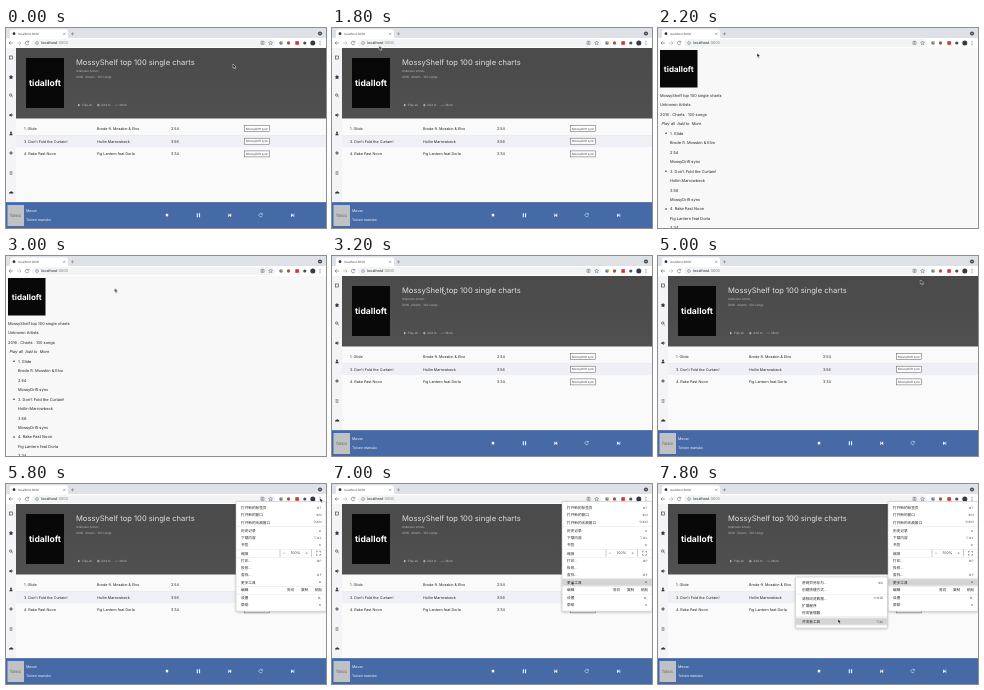
Animation of 320 by 200 pixels, one loop 8 s. Source, as an HTML page:

```html
<!DOCTYPE html>
<html lang="en">
<head>
<meta charset="utf-8">
<title>Music page</title>
<style>
  html, body { margin: 0; width: 100%; height: 100%; overflow: hidden; background: #fff; }
  svg { display: block; width: 100vw; height: 100vh; }
  text { font-family: Inter, "Noto Sans CJK SC", "Noto Sans CJK", "DejaVu Sans", sans-serif; white-space: pre; text-rendering: geometricPrecision; }
  .styled, .plain, .menu, .submenu, .hover, .subhover { animation: 8s step-end infinite; }
  .styled { animation-name: styled; }
  .plain { animation-name: plain; }
  .menu { animation-name: menu; }
  .submenu { animation-name: submenu; }
  .hover { animation-name: hover; }
  .subhover { animation-name: subhover; }
  .cursor { animation: cursor 8s linear infinite; }
  @keyframes styled { 0% { opacity: 1 } 27.5% { opacity: 0 } 40%, 100% { opacity: 1 } }
  @keyframes plain { 0% { opacity: 0 } 27.5% { opacity: 1 } 40%, 100% { opacity: 0 } }
  @keyframes menu { 0% { opacity: 0 } 72.5%, 100% { opacity: 1 } }
  @keyframes submenu { 0% { opacity: 0 } 92.5%, 100% { opacity: 1 } }
  @keyframes hover {
    0% { opacity: 0; transform: translateY(24px) }
    80% { opacity: 1; transform: translateY(31px) }
    82.5% { opacity: 1; transform: translateY(54px) }
    85% { opacity: 1; transform: translateY(77px) }
    87.5%, 100% { opacity: 1; transform: translateY(98.2px) }
  }
  @keyframes subhover {
    0% { opacity: 0; transform: translateY(121.4px) }
    95% { opacity: 1; transform: translateY(121.4px) }
    97.5%, 100% { opacity: 1; transform: translateY(137.4px) }
  }
  @keyframes cursor {
    0%, 2.5% { transform: translate(227px, 36px) }
    15%, 20% { transform: translate(21px, 14px) }
    27.5% { transform: translate(99px, 25px) }
    40%, 47.5% { transform: translate(111px, 34px) }
    60%, 62.5% { transform: translate(262.5px, 24px) }
    70%, 77.5% { transform: translate(314px, 14px) }
    87.5%, 90% { transform: translate(239.5px, 97px) }
    92.5% { transform: translate(225px, 98px) }
    97.5%, 100% { transform: translate(180px, 135px) }
  }
</style>
</head>
<body>
<svg id="stage" viewBox="0 0 320 200" preserveAspectRatio="none"></svg>
<script>
const rect = (x, y, w, h, fill, more = '') =>
  `<rect x="${x}" y="${y}" width="${w}" height="${h}" fill="${fill}" ${more}/>`;
const dot = (x, y, r, fill, more = '') => `<circle cx="${x}" cy="${y}" r="${r}" fill="${fill}" ${more}/>`;
const line = (d, color, width = 0.6) =>
  `<path d="${d}" fill="none" stroke="${color}" stroke-width="${width}"/>`;
const shape = (d, fill) => `<path d="${d}" fill="${fill}"/>`;
// y is the vertical middle of the line
const text = (x, y, s, size = 3.7, fill = '#222', more = '') =>
  `<text x="${x}" y="${y + size * 0.36}" font-size="${size}" fill="${fill}" ${more}>${s.replace(/&/g, '&amp;')}</text>`;
const group = (name, ...parts) => `<g class="${name}">${parts.join('')}</g>`;
const END = 'text-anchor="end"';
const MIDDLE = 'text-anchor="middle"';

const album = 'MossyShelf top 100 single charts';
const sync = 'MossyDrift sync';
const songs = [
  ['1. Glide', 'Brode ft. Mosskin & Elvo', '2:54'],
  ["3. Don't Fold the Curtain!", 'Hollin Marrowbeck', '3:56'],
  ['4. Rake Past Noon', 'Fig Lantern feat Dorla', '3:34'],
];

function cover(x, y, w, h, size) {
  return rect(x, y, w, h, '#080808') +
    text(x + w / 2, y + h / 2, 'tidalloft', size, '#fff', `font-weight="700" ${MIDDLE}`);
}

function browser() {
  const grey = '#5f6368';
  return [
    rect(0, 0, 320, 20, '#dee1e6'),
    shape('M2 10.5 Q4 10.5 4 8 V3.5 Q4 1.5 6 1.5 H60 Q62 1.5 62 3.5 V8 Q62 10.5 64 10.5Z', '#fff'),
    rect(0, 10, 320, 10, '#fff'),
    dot(8, 5.7, 1.4, '#333'),
    text(12, 5.8, 'localhost:3000', 3, '#444'),
    line('M57.2 4.8l2 2m0-2l-2 2M65 5.8h3m-1.5-1.5v3', grey, 0.45),
    dot(314, 5.5, 2.1, '#494c50'),
    line('M313 5l1 1l1-1', '#fff', 0.4),
    line('M7 15h-4m1.7-1.7l-1.7 1.7l1.7 1.7', grey),
    line('M11 15h4m-1.7-1.7l1.7 1.7l-1.7 1.7', '#aaa'),
    line('M22.5 13.9a1.8 1.8 0 1 0 .3 1.7M22.8 12.8v1.4h-1.4', grey),
    rect(26, 11.3, 243, 7.6, '#f1f3f4', 'rx="3.8"'),
    dot(31, 15, 1.4, 'none', `stroke="${grey}" stroke-width=".5"`),
    text(35, 15, 'localhost', 3.8, '#222'),
    text(51.4, 15, ':3000', 3.8, '#777'),
    line('M255 13.3h3v3h-3zM256.5 13.3v3M264.6 13l.6 1.2 1.4.2-1 1 .2 1.3-1.2-.6-1.2.6.2-1.3-1-1 1.4-.2z', grey, 0.5),
    dot(275, 15, 1.8, '#5b7fb0'),
    dot(276, 14, 1.1, '#edc24d'),
    dot(282.5, 15, 1.7, '#a4544e'),
    rect(289.3, 13.2, 3.6, 3.6, '#d6362f'),
    dot(298.8, 15, 1.6, '#4a4d52'),
    dot(306.8, 15, 2.5, '#333b4a'),
    [13.2, 15, 16.8].map(y => dot(314, y, 0.5, grey)).join(''),
  ].join('');
}

function sidebar() {
  const ink = '#303238';
  return [
    rect(0, 20, 10, 154, '#f4f4f6'),
    rect(3.5, 28, 3, 3, 'none', `stroke="${ink}" stroke-width=".6"`),
    shape('M5 46.8l.8 1.5 1.5.2-1.1 1.1.3 1.6-1.5-.8-1.5.8.3-1.6-1.1-1.1 1.5-.2z', ink),
    dot(4.7, 67, 1.2, 'none', `stroke="${ink}" stroke-width=".6"`),
    line('M5.6 68l1.2 1.2', ink),
    shape('M3.4 86.2h1.1l1.2-1v3.8l-1.2-1H3.4z', ink),
    line('M6.4 86q.8 1.1 0 2.2', ink, 0.4),
    dot(5, 104.4, 0.9, ink),
    shape('M3.4 107.3q0-2 1.6-2t1.6 2z', ink),
    dot(5, 125, 1.1, 'none', `stroke="${ink}" stroke-width=".9"`),
    line('M3.6 143.7h2.8m-2.8 1.3h2.8m-2.8 1.3h2.8', ink, 0.5),
    shape('M3 165.4q-.3-1.5 1.1-1.5 1.2-1.6 2.4.2 1.2.2.8 1.3z', ink),
  ].join('');
}

function player() {
  const white = '#f4f7fc';
  return [
    rect(0, 174, 320, 26, '#466aa6'),
    rect(0, 174, 320, 0.6, '#6e8cbb'),
    rect(1.5, 177, 16.5, 21, '#bfc1c3'),
    text(9.7, 187.5, 'folsic', 4.3, '#62656a', MIDDLE),
    text(20, 182.5, 'Meow', 3.7, white),
    text(20, 191.5, 'Tolven marisko', 3.5, white),
    rect(159.8, 185.8, 2.4, 2.6, white),
    shape('M190.8 185.2h1.1v4h-1.1zM193 185.2h1.1v4H193z', white),
    shape('M222 185.4h.6v3.6h-.6zM222.6 187.2l2.6-1.8v3.6z', white),
    line('M256 186a1.7 1.7 0 1 0 .3 1.6M256.5 185v1.3h-1.3', white, 0.5),
    shape('M285 185.4l2.6 1.8-2.6 1.8zM287.6 185.4h.6v3.6h-.6z', white),
  ].join('');
}

function styledPage() {
  const pale = '#bdbdbd';
  const rows = songs.map(([title, artist, time], i) => {
    const y = 100.5 + i * 12.7;
    return (i === 1 ? rect(10, 107.3, 310, 11.7, '#eff0f5') + rect(10, 107, 310, 0.5, '#f1dede') : '') +
      text(18, y, title) + text(91, y, artist) + text(165, y, time) +
      rect(238.7, y - 3, 25, 6, '#fff', 'stroke="#555" stroke-width=".5"') +
      text(251.2, y, sync, 2.9, '#333', MIDDLE);
  });
  return group('styled',
    rect(10, 20, 310, 154, '#fafafa'),
    rect(10, 20, 310, 70.5, 'url(#head)'),
    cover(20, 30, 38, 50, 8.6),
    text(70, 34.3, album, 7.6, '#dedede'),
    text(70, 43.3, 'Unknown Artists', 2.9, pale),
    text(70, 49, '2016 . Charts . 100 songs', 3, pale),
    shape('M72 75.8l2.2 1.3-2.2 1.3z', pale), text(76, 77.1, 'Play all', 3, pale),
    line('M91 77.1h2.6m-1.3-1.3v2.6', pale, 0.8), text(95.3, 77.1, 'Add to', 3, pale),
    [109, 110.3, 111.6].map(x => dot(x, 77.1, 0.4, pale)).join(''), text(113.5, 77.1, 'More', 3, pale),
    ...rows, sidebar(), player());
}

function plainPage() {
  const items = songs.flatMap(([title, artist, time]) => [title, artist, time, sync]);
  return group('plain',
    rect(0, 20, 320, 180, '#f8f8f8'),
    cover(2, 22, 37.5, 37.5, 8),
    text(2, 67.3, album, 3.94),
    text(2, 76.8, 'Unknown Artists', 3.94),
    text(2, 86.3, '2016 . Charts . 100 songs', 3.94),
    text(3.5, 95.8, 'Play all  Add to  More', 3.94, '#222', 'font-style="italic"'),
    ...items.map((s, i) => {
      const y = 105.3 + i * 9.47;
      return (i % 4 ? '' : dot(8, y, 0.8, '#222')) + text(12, y, s, 3.94);
    }));
}

const arrow = (x, y) => shape(`M${x} ${y - 1.1}l1.5 1.1-1.5 1.1z`, '#555');
const panel = (x, y, w, h) => rect(x, y, w, h, '#fff', 'rx="1" stroke="#bbb" stroke-width=".5" filter="url(#shadow)"');

// Each item is [y, label, shortcut]; '>' marks a nested menu
const menuItems = (left, right, items) => items.map(([y, label, key]) =>
  text(left, y, label, 3.65) +
  (key === '>' ? arrow(right - 2, y) : key ? text(right, y, key, 3.1, '#555', END) : '')).join('');

function mainMenu() {
  const rule = y => rect(230, y, 90, 0.4, '#ddd');
  return group('menu',
    panel(230, 17.5, 90, 109.8),
    group('hover', rect(230, -3.6, 90, 7.2, '#d4d4d6')),
    [42.5, 65, 73, 102.2, 110].map(rule).join(''),
    menuItems(235, 315.5, [
      [23.7, '打开新的标签页', '⌘T'], [31, '打开新的窗口', '⌘N'], [38.3, '打开新的无痕窗口', '⇧⌘N'],
      [47, '历史记录', '>'], [54, '下载内容', '⌥⌘L'], [61, '书签', '>'],
      [69.2, '缩放'], [77, '打印...', '⌘P'], [84, '投射...'], [91, '查找...', '⌘F'],
      [98.2, '更多工具', '>'], [106, '编辑'], [114, '设置', '⌘,'], [121, '帮助', '>'],
    ]),
    line('M274 65.3v7.5M305.5 65.3v7.5M277 69.2h2.2M299.5 69.2h2.2m-1.1-1.1v2.2', '#777', 0.4),
    text(289.5, 69.2, '100%', 3.5, '#333', MIDDLE),
    line('M310.5 68.5v-1.3h1.3m1.4 0h1.3v1.3m0 1.4v1.3h-1.3m-1.4 0h-1.3v-1.3', '#444', 0.5),
    ['剪切', '复制', '粘贴'].map((s, i) => text(281 + i * 14, 106, s, 3.6)).join(''));
}

function toolsMenu() {
  return group('submenu',
    panel(137.5, 93, 92, 51),
    group('subhover', rect(137.5, -3.6, 92, 7.2, '#d4d4d6')),
    rect(137.5, 110, 92, 0.4, '#ddd'),
    rect(137.5, 132.4, 92, 0.4, '#ddd'),
    menuItems(144, 225, [
      [98.6, '将网页另存为...', '⌘S'], [105.8, '创建快捷方式...'],
      [114.2, '清除浏览数据...', '⇧⌘⌫'], [121.4, '扩展程序'], [128.4, '任务管理器'],
      [137.4, '开发者工具', '⌥⌘I'],
    ]));
}

const defs = `<defs>
  <linearGradient id="head" x1="0" y1="0" x2="0" y2="1">
    <stop offset="0" stop-color="#4a4a4a"/><stop offset="1" stop-color="#505050"/>
  </linearGradient>
  <filter id="shadow" x="-10%" y="-10%" width="120%" height="120%">
    <feDropShadow dx="0" dy=".8" stdDeviation="1" flood-opacity=".25"/>
  </filter>
</defs>`;
const pointer = group('cursor',
  '<path d="M0 0V4.2L1 3.3 1.7 4.9 2.5 4.5 1.8 3H3.1Z" fill="#111" stroke="#fff" stroke-width=".45"/>');

document.getElementById('stage').innerHTML =
  defs + plainPage() + styledPage() + browser() + mainMenu() + toolsMenu() + pointer;
</script>
</body>
</html>
```
